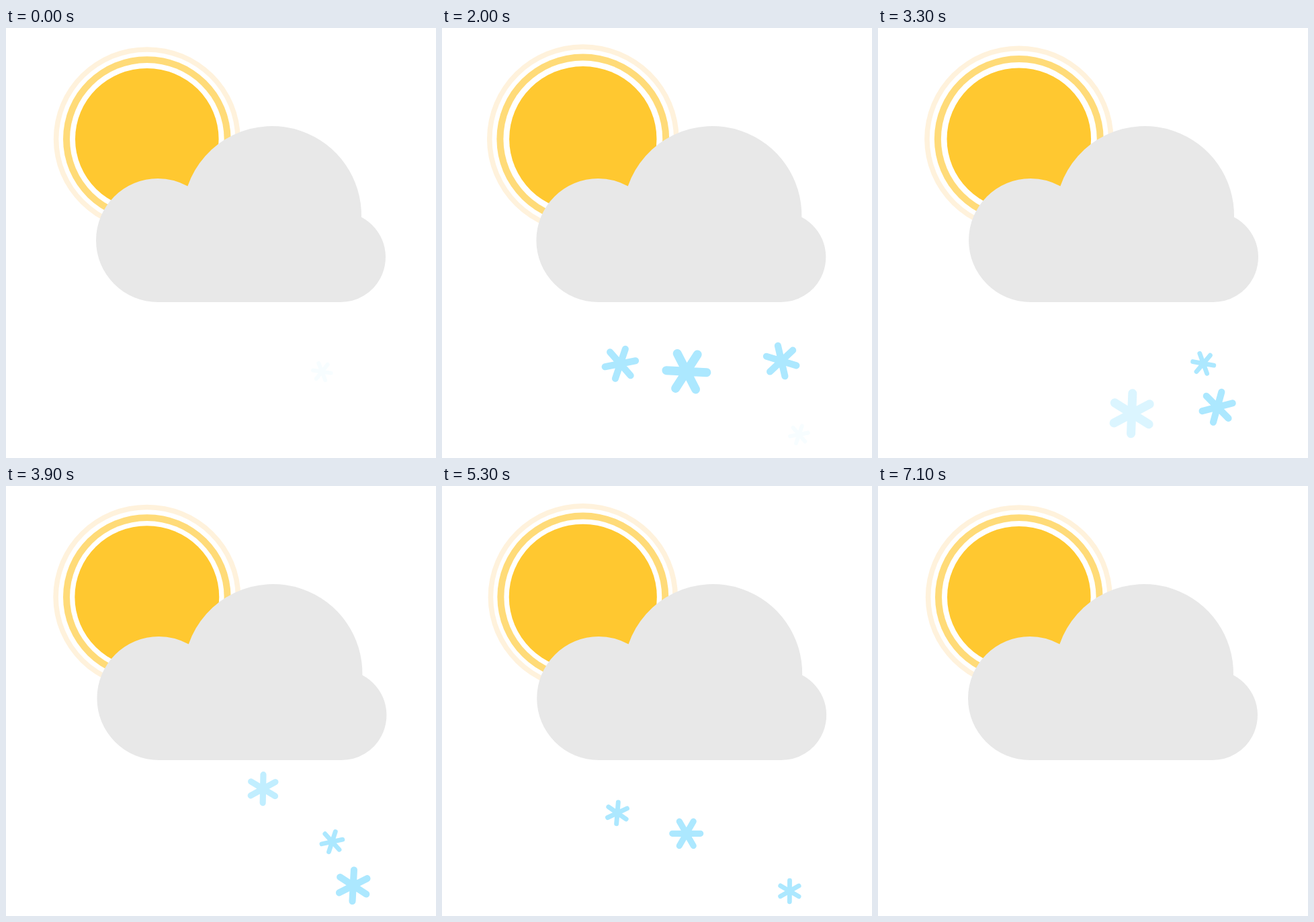
An HTML page with a canvas that plays this animation: 640 by 640 pixels, repeating every 7.2 s.

```html
<!DOCTYPE html>
<html lang="en">
<head>
<meta charset="utf-8">
<title>Sun, cloud and snow</title>
<style>
  html, body { margin: 0; width: 100%; height: 100%; overflow: hidden; background: #fff; }
  canvas { display: block; }
</style>
</head>
<body>
<canvas id="stage" width="640" height="640"></canvas>
<script>
const ctx = document.getElementById('stage').getContext('2d');
const FRAMES = 72, STEP = 100, END = 7.1;
const FADE = 0.3, SPEED = 52;
const rad = degrees => degrees * Math.PI / 180;

const cloud = new Path2D();
cloud.arc(226, 316, 92, rad(90), rad(-61));
cloud.arc(396, 279, 133, rad(199.2), rad(1));
cloud.arc(498, 341, 67, rad(-62.5), rad(90));
cloud.closePath();

// A flake glides between two points, each with its heading in degrees
const left = { from: { x: 217, y: 443, heading: 29 }, to: { x: 262, y: 528, heading: 115 },
  start: 0.5, life: 2.1, size: 23.2 };
const middle = { from: { x: 389, y: 441, heading: 126 }, to: { x: 381, y: 579.7, heading: 59 },
  start: 0.5, life: 2.93, size: 30 };
const right = { from: { x: 519, y: 468, heading: 127 }, to: { x: 529.3, y: 615, heading: 53 },
  start: 1.4, life: 2.95, size: 23.3 };
const rightEarly = { from: { x: 469, y: 510.6, heading: 38 }, to: { x: 531.7, y: 606.6, heading: 80 },
  start: -0.03, life: 2.06, size: 13.6 };
const rightLate = { from: { x: 497, y: 473.5, heading: 133 }, to: { x: 525.5, y: 617, heading: 60 },
  start: 2.7, life: 2.9, size: 15.8 };
const flakes = [left, middle, right, rightEarly, rightLate,
  { ...left, start: 4.09, size: 16 },
  { ...middle, start: 3.675, size: 21 }];

// Rises, falls and rises again, each in `rise` seconds, then returns to 0 at the end
function pulse(t, rise) {
  if (t > 3 * rise) return 1 - (t - 3 * rise) / (END - 3 * rise);
  const phase = t / rise % 2;
  return phase < 1 ? phase : 2 - phase;
}

// Cubic Hermite curve: value and slope at s in 0..1
function hermite(p, q, m, n, s) {
  const c = 3 * (q - p) - 2 * m - n, d = 2 * (p - q) + m + n;
  return [p + s * (m + s * (c + s * d)), m + s * (2 * c + 3 * s * d)];
}

function drawFlake({ from, to, start, life, size }, time) {
  const age = time - start;
  const alpha = Math.min(1, age / FADE, (life - age) / FADE);
  if (alpha <= 0) return;
  const along = (axis, fn) => hermite(from[axis], to[axis],
    SPEED * life * fn(rad(from.heading)), SPEED * life * fn(rad(to.heading)), age / life);
  const [x, dx] = along('x', Math.cos), [y, dy] = along('y', Math.sin);
  ctx.save();
  ctx.globalAlpha = alpha;
  ctx.translate(x, y);
  ctx.rotate(Math.atan2(dy, dx) + Math.PI / 2);
  ctx.beginPath();
  for (let arm = 0; arm < 3; arm++) {
    ctx.moveTo(-size, 0);
    ctx.lineTo(size, 0);
    ctx.rotate(Math.PI / 3);
  }
  ctx.strokeStyle = '#ace8ff';
  ctx.lineWidth = size * 0.435;
  ctx.lineCap = 'round';
  ctx.stroke();
  ctx.restore();
}

function disc(radius, color) {
  ctx.beginPath();
  ctx.ellipse(209.8, 165.2, radius, radius * 0.986, 0, 0, 2 * Math.PI);
  ctx.fillStyle = color;
  ctx.fill();
}

function ring(radius, width, color) {
  disc(radius, color);
  disc(radius - width, '#fff');
}

function draw(now) {
  const t = Math.floor(now / STEP) % FRAMES * STEP / 1000;
  const sway = pulse(t, END / 4);
  ctx.clearRect(0, 0, 640, 640);
  ring(139 + 4 * pulse(t, 2.08), 7.6, '#fff2dc');
  ring(124.8 + 3.7 * pulse(t, 1.95), 10, '#ffdb78');
  disc(106.8 + 3.3 * sway, '#ffc830');
  for (const flake of flakes) drawFlake(flake, t);
  ctx.save();
  ctx.translate(7.3 * sway, 0);
  ctx.fillStyle = '#e8e8e8';
  ctx.fill(cloud);
  ctx.restore();
  requestAnimationFrame(draw);
}
requestAnimationFrame(draw);
</script>
</body>
</html>
```
